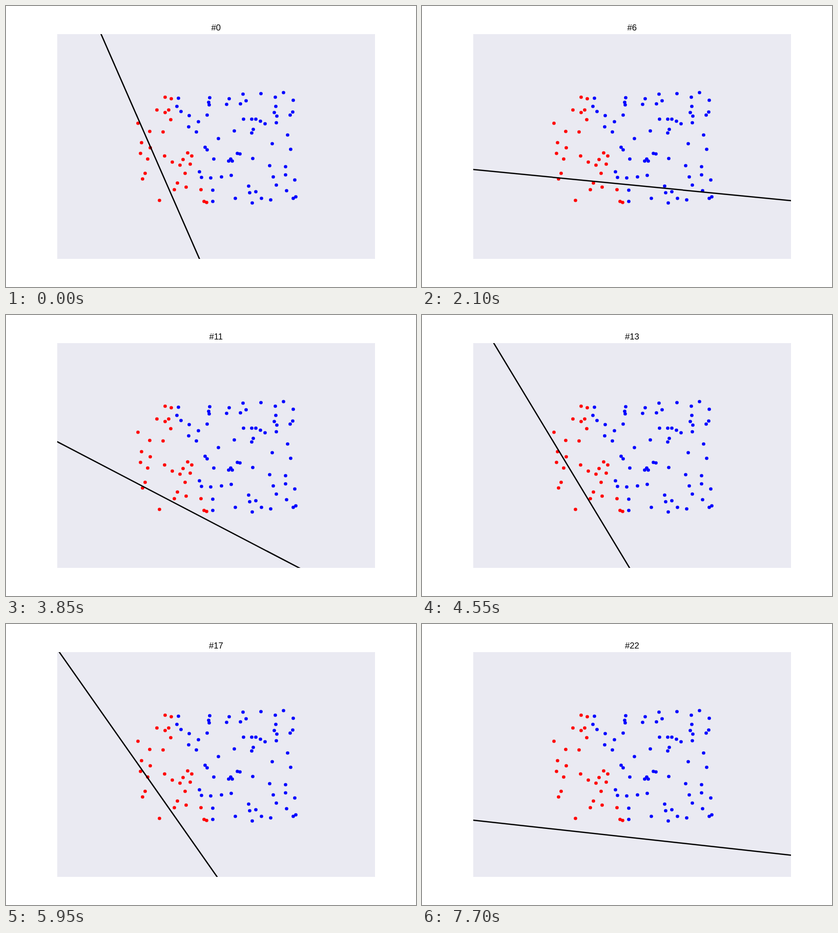
Write an HTML page that moves like this. It is 800 px wide and 550 px high and loops after 8000 ms.

```html
<!DOCTYPE html>
<html lang="en">
<head>
<meta charset="utf-8">
<title>Separating line</title>
<style>
  html, body { margin: 0; width: 100%; height: 100%; overflow: hidden; background: #fff; }
  svg { display: block; width: 800px; height: 550px; }
  text { font: 16.67px "Liberation Sans", Arial, sans-serif; text-anchor: middle; }
</style>
</head>
<body>
<svg viewBox="0 0 800 550">
  <clipPath id="plot"><rect x="100" y="55" width="620" height="440"/></clipPath>
  <rect x="100" y="55" width="620" height="440" fill="#eaeaf2"/>
  <g id="dots" transform="translate(.5 .5)"></g>
  <g clip-path="url(#plot)"><line id="boundary" stroke="#000" stroke-width="2.5"/></g>
  <text id="title" x="409.8" y="48"></text>
</svg>
<script>
const STEP = 350, LOOP = 8000;

const red = [
  [310,178], [322,181], [294,203], [310,208], [317,203], [321,222], [257,229], [280,245],
  [306,246], [264,267], [281,277], [262,288], [276,299], [309,293], [324,305], [339,311],
  [345,300], [354,287], [362,293], [359,309], [349,327], [271,327], [266,338], [334,346],
  [328,359], [351,354], [380,359], [299,380], [386,382], [391,384]
];

const blue = [
  [336,180], [333,196], [341,206], [357,214], [375,226], [356,236], [371,246], [392,213],
  [397,179], [395,188], [396,193], [435,181], [430,192], [462,172], [468,185], [457,191],
  [497,171], [525,178], [541,169], [560,184], [526,196], [523,208], [528,215], [559,207],
  [554,213], [527,228], [463,221], [479,221], [487,221], [496,225], [505,230], [482,241],
  [479,248], [445,244], [414,259], [388,276], [392,281], [405,299], [438,299], [434,303],
  [441,303], [451,288], [456,289], [481,298], [519,269], [549,252], [555,280], [514,312],
  [545,314], [545,330], [521,334], [563,340], [527,350], [547,361], [565,373], [560,376],
  [516,379], [498,376], [487,363], [475,365], [473,352], [480,385], [447,376], [439,331],
  [420,334], [399,336], [381,335], [377,324], [403,360], [403,382]
];

// Where the boundary enters and leaves the plot at each iteration.
const boundaries = [
  [185.5,55, 377.5,495], [215,55, 410,495], [100,189.5, 561,495], [100,250, 720,440],
  [100,215, 616,495], [100,195, 550,495], [100,320, 720,381], [100,235, 620,495],
  [100,270, 720,430], [100,210, 570,495], [100,252, 619,495], [100,248, 572,495],
  [100,170, 459,495], [140,55, 405,495], [100,125, 720,404], [100,171.5, 720,398.5],
  [195,55, 405,495], [104,55, 412,495], [140,55, 683,495], [100,245.5, 720,370],
  [100,290, 720,386.5], [100,336, 720,400.5], [100,384, 720,452.5]
];

const byId = id => document.getElementById(id);

function setAttributes(node, values) {
  for (const key in values) node.setAttribute(key, values[key]);
}

function addDots(points, fill) {
  for (const [cx, cy] of points) {
    const dot = document.createElementNS("http://www.w3.org/2000/svg", "circle");
    setAttributes(dot, { cx, cy, r: 3.3, fill });
    byId("dots").append(dot);
  }
}

function draw(time) {
  const iteration = Math.floor((time % LOOP) / STEP);
  const [x1, y1, x2, y2] = boundaries[iteration];
  const dx = (x2 - x1) * 0.1, dy = (y2 - y1) * 0.1;
  setAttributes(byId("boundary"), { x1: x1 - dx, y1: y1 - dy, x2: x2 + dx, y2: y2 + dy });
  byId("title").textContent = "#" + iteration;
}

addDots(red, "#f00");
addDots(blue, "#00f");

const start = performance.now();
function tick() {
  draw(performance.now() - start);
  requestAnimationFrame(tick);
}
tick();
</script>
</body>
</html>
```
